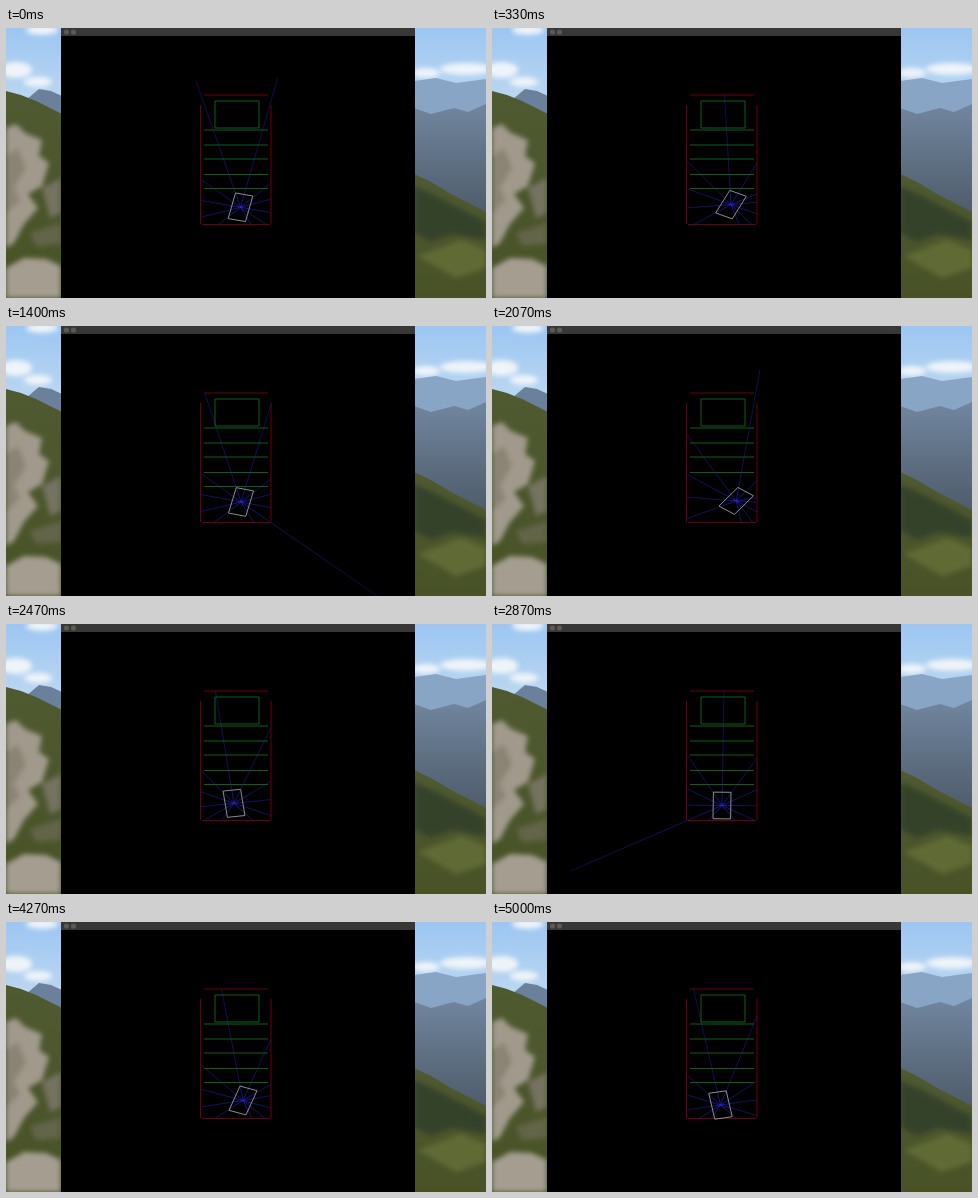
Animation of 480x270 px, one loop 5070 ms. Source, as an HTML page:

```html
<!DOCTYPE html>
<html lang="en">
<head>
<meta charset="utf-8">
<title>Parking sensors</title>
<style>
  html, body { margin: 0; width: 100%; height: 100%; overflow: hidden; background: #000; }
  svg { display: block; width: 100vw; height: 100vh; }
</style>
</head>
<body>
<svg viewBox="0 0 480 270">
  <defs>
    <linearGradient id="sky" x2="0" y2="1">
      <stop offset="0" stop-color="#9cc6f2"/><stop offset="1" stop-color="#c3dbf1"/>
    </linearGradient>
    <linearGradient id="ridge" x2="0" y2="1">
      <stop offset="0" stop-color="#71869f"/><stop offset="1" stop-color="#4d5a68"/>
    </linearGradient>
    <linearGradient id="meadow" x2="0" y2="1">
      <stop offset="0" stop-color="#4f5a31"/><stop offset="1" stop-color="#485226"/>
    </linearGradient>
    <radialGradient id="beam" gradientUnits="userSpaceOnUse" cx="0" cy="0" r="165">
      <stop offset="0" stop-color="#2828e8"/>
      <stop offset=".12" stop-color="#1c1c9c"/>
      <stop offset="1" stop-color="#14146c"/>
    </radialGradient>
    <filter id="soft"><feGaussianBlur stdDeviation="2.5"/></filter>
  </defs>

  <rect width="480" height="90" fill="url(#sky)"/>
  <g fill="#eff4f9" filter="url(#soft)">
    <ellipse cx="10" cy="42" rx="16" ry="8"/>
    <ellipse cx="32" cy="54" rx="14" ry="5"/>
    <ellipse cx="36" cy="2" rx="16" ry="5"/>
    <ellipse cx="460" cy="41" rx="26" ry="6"/>
    <ellipse cx="420" cy="45" rx="14" ry="5"/>
  </g>

  <path d="M20 72L33 61L45 63L56 68V100H20Z" fill="#6a809b"/>
  <path d="M0 63L15 67L30 73L56 86V270H0Z" fill="url(#meadow)"/>
  <g filter="url(#soft)">
    <path d="M0 100L10 96L19 105L36 112L33 128L43 135L36 158L22 166L32 180L18 196L8 215L0 220Z" fill="#a19a8c"/>
    <path d="M0 128L12 120L20 140L8 160L14 172L0 186Z" fill="#8b8474"/>
    <path d="M36 160L55 150V185L44 190Z" fill="#757260"/>
    <path d="M0 240L18 230L40 231L55 238V270H0Z" fill="#a49d90"/>
    <path d="M24 205L55 195V216L30 218Z" fill="#646548"/>
  </g>

  <path d="M408 53L430 50L450 55L480 51V110H408Z" fill="#88a5c6"/>
  <path d="M408 80L425 86L448 80L462 84L480 76V190H408Z" fill="url(#ridge)"/>
  <path d="M408 146L425 154L445 166L480 184V270H408Z" fill="url(#meadow)"/>
  <g filter="url(#soft)">
    <path d="M408 158L430 168L480 194V212L446 206L425 214L408 205Z" fill="#36432a"/>
    <path d="M412 228L455 212L480 222V240L450 250Z" fill="#606b35"/>
  </g>

  <path d="M55 0H409V270H55Z"/>
  <path d="M55 0H409V8H55Z" fill="#383735"/>
  <g fill="#5c5a57"><circle cx="60.5" cy="4" r="2.6"/><circle cx="67.5" cy="4" r="2.6"/></g>

  <path id="walls" fill="none" stroke="#6c000a"/>
  <path id="rays" fill="none" stroke="url(#beam)" stroke-width=".6"/>
  <g fill="none" stroke="#08601a">
    <path d="M209 73H253V100H209Z"/>
    <path d="M198 102H262M198 117H262M198 131H262M198 146.500H262"/>
    <path id="firstGate" d="M198 160.500H262"/>
  </g>
  <path id="car" fill="none" stroke="#8c8c8c"/>
</svg>
<script>
  const LOOP = 5070, FRAMES = 76, STEP = LOOP / FRAMES, RAD = Math.PI / 180;
  const HALF_LENGTH = 13.3, HALF_WIDTH = 8.8, SKEW = 0.62;
  const byId = id => document.getElementById(id);

  // x1, y1, x2, y2
  const walls = [
    [198, 67, 262, 67], [194.5, 77, 194.5, 196],
    [265, 77, 265, 196], [196, 196.5, 264, 196.5]
  ];

  const bothSides = ([angle, reach]) => [[angle, reach], [-angle, reach]];
  // Heading and maximum reach: the front set follows the nose, the side set the axle.
  const frontSensors = [[0, 135], ...bothSides([35.4, 133])];
  const sideSensors = [[65, 135], [90, 135], [114, 165], [138, 135]].flatMap(bothSides);

  // Each attempt leaves the start and drives through the pose at its time "at".
  const START = [230, 182, 0];
  const attempts = [
    { from: -330, at: 0, pose: [234.5, 179.3, 16] },
    { from: 530, at: 730, pose: [234, 175, 13] },
    { from: 1000, at: 1400, pose: [235, 176, 17] },
    { from: 1530, at: 2060, pose: [244, 175, 45], gate: 1930 },
    { from: 2200, at: 2600, pose: [227, 178, -14] },
    { from: 2800, at: 2870, pose: [230, 181.5, 1] },
    { from: 3330, at: 3600, pose: [229, 180.5, -7] },
    { from: 3870, at: 4270, pose: [237, 178.5, 24.5] },
    { from: 4530, at: 5000, pose: [228.5, 183, -13] }
  ];

  const segment = ([x1, y1, x2, y2]) => `M${x1} ${y1}L${x2} ${y2}`;
  const direction = heading => [Math.sin(heading * RAD), -Math.cos(heading * RAD)];
  byId('walls').setAttribute('d', walls.map(segment).join(''));

  function castRay(x, y, heading, reach) {
    const [dx, dy] = direction(heading);
    let length = reach;
    for (const [x1, y1, x2, y2] of walls) {
      const wx = x2 - x1, wy = y2 - y1, det = dx * wy - dy * wx;
      if (Math.abs(det) < 1e-6) continue;
      const along = ((x1 - x) * wy - (y1 - y) * wx) / det;
      const across = ((x1 - x) * dy - (y1 - y) * dx) / det;
      if (along > 0 && across >= 0 && across <= 1) length = Math.min(length, along);
    }
    return segment([0, 0, dx * length, dy * length]);
  }

  function carOutline(nose, axle) {
    const [nx, ny] = direction(nose), [ax, ay] = direction(axle + 90);
    const corners = [[1, -1], [1, 1], [-1, 1], [-1, -1]].map(([f, s]) => [
      f * HALF_LENGTH * nx + s * HALF_WIDTH * ax,
      f * HALF_LENGTH * ny + s * HALF_WIDTH * ay
    ]);
    return `M${corners.join('L')}Z`;
  }

  function render(time) {
    const t = Math.floor((time % LOOP + 4) / STEP) % FRAMES * STEP;
    const run = attempts.filter(a => a.from <= t + 4).pop();
    const progress = Math.min(2, Math.max(0, (t - run.from) / (run.at - run.from)));
    const [x, y, nose] = START.map((s, i) => s + (run.pose[i] - s) * progress);
    const axle = nose * SKEW;
    const cast = (sensors, base) =>
      sensors.map(([angle, reach]) => castRay(x, y, base + angle, reach)).join('');

    for (const id of ['car', 'rays']) byId(id).setAttribute('transform', `translate(${x} ${y})`);
    byId('car').setAttribute('d', carOutline(nose, axle));
    byId('rays').setAttribute('d', cast(frontSensors, nose) + cast(sideSensors, axle));
    byId('firstGate').setAttribute('visibility', t > run.gate ? 'hidden' : 'visible');
  }

  const begin = performance.now();
  function tick() {
    render(performance.now() - begin);
    requestAnimationFrame(tick);
  }
  tick();
</script>
</body>
</html>
```
